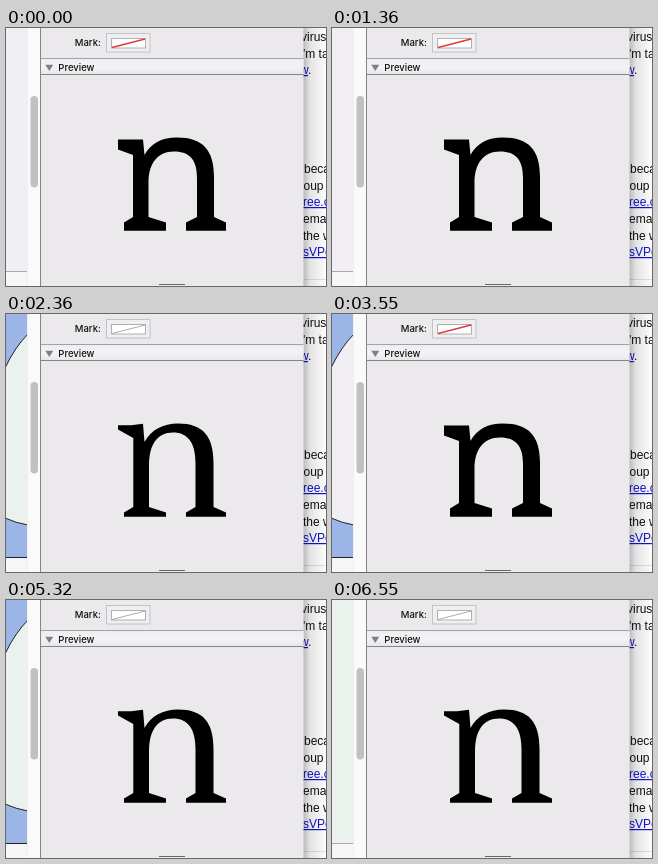
Recreate the animation shown at these times as an HTML page. Size 320 by 258 pixels, loop 6600 ms.

```html
<!DOCTYPE html>
<html lang="en">
<head>
<meta charset="utf-8">
<title>Glyph preview</title>
<style>
  html, body { margin: 0; width: 100%; height: 100%; overflow: hidden; background: #fff; }
  svg { display: block; width: 320px; height: 258px; }
  .ui { font: 500 9.5px Inter, sans-serif; fill: #111; }
  .page { font: 12px "Liberation Sans", Arial, sans-serif; fill: #111; }
  .link { fill: #1212d6; text-decoration: underline; }

  .slab, .serif, .zoom { animation: 6600ms step-end infinite; }
  .slab { animation-name: slab; }
  .serif { animation-name: serif; }
  .zoom { animation-name: zoom; }

  @keyframes slab {
    0%, 38.64%, 53.78% { opacity: 1; }
    31.06%, 46.21%, 64.09%, 100% { opacity: 0; }
  }
  @keyframes serif {
    0%, 38.64%, 53.78% { opacity: 0; }
    31.06%, 46.21%, 64.09%, 100% { opacity: 1; }
  }
  @keyframes zoom {
    0%, 97.12%, 100% { opacity: 0; }
    21.36% { opacity: 1; }
  }
</style>
</head>
<body>
<svg viewBox="0 0 320 258">
  <defs>
    <linearGradient id="bar" x2="0" y2="1">
      <stop stop-color="#eeedef"/>
      <stop offset=".5" stop-color="#f3f2f4"/>
      <stop offset="1" stop-color="#e6e5e7"/>
    </linearGradient>
    <linearGradient id="shade">
      <stop stop-color="#000" stop-opacity=".28"/>
      <stop offset=".3" stop-color="#000" stop-opacity=".11"/>
      <stop offset="1" stop-color="#000" stop-opacity=".01"/>
    </linearGradient>
    <clipPath id="canvas"><path d="M0 0H21V244H0z"/></clipPath>
  </defs>

  <!-- text page behind the panel -->
  <rect width="320" height="258" fill="#fff"/>
  <g class="page">
    <text x="295" y="13">virus</text>
    <text x="297" y="29.5">'m ta</text>
    <text x="294" y="46"><tspan class="link">w</tspan>.</text>
    <text x="298" y="145">beca</text>
    <text x="297.5" y="161.5">oup</text>
    <text x="297" y="178" class="link">ree.c</text>
    <text x="297" y="194.5">ema</text>
    <text x="297" y="211.5">the w</text>
    <text x="297" y="228" class="link">sVPe</text>
  </g>
  <path d="M298 251.5H320" stroke="#e2e2e2"/>
  <rect x="297" width="23" height="258" fill="url(#shade)"/>

  <!-- glyph canvas and its scrollbar -->
  <rect width="35" height="258" fill="#f6f6f6"/>
  <rect class="slab" width="21" height="243" fill="#f1eff4"/>
  <rect class="serif" width="21" height="243" fill="#ebf1ed"/>
  <path d="M0 243.5H21" stroke="#a9a9a9"/>
  <g class="zoom" clip-path="url(#canvas)" fill="#9ab5e6" stroke="#222">
    <path d="M-1 -1H22V20Q9 33 -1 54z"/>
    <path d="M-1 204Q10 209 22 211V243.5H-1z"/>
  </g>
  <rect x="21" width="13" height="258" fill="#fafafa"/>
  <path d="M21.5 0V258" stroke="#eeeeee"/>
  <rect x="24.5" y="68" width="7.5" height="91.5" rx="3.75" fill="#c1c1c1"/>

  <!-- inspector panel -->
  <rect x="34" width="263.5" height="258" fill="#ebe9eb"/>
  <path d="M34.5 0V258" stroke="#858488"/>
  <rect x="35" y="31" width="262.5" height="16" fill="url(#bar)"/>
  <path d="M35 30.5H297.5" stroke="#a3a2a5"/>
  <path d="M35 46.5H297.5" stroke="#858488"/>
  <path d="M39.3 36.8H47.3L43.3 43z" fill="#808083"/>
  <text class="ui" x="52.3" y="42.7">Preview</text>
  <text class="ui" x="68.8" y="18.3">Mark:</text>

  <rect x="100.5" y="5.5" width="43.5" height="18.5" fill="#efeef0" stroke="#c3c2c5"/>
  <rect x="105.5" y="10.5" width="34" height="9.5" fill="#fff" stroke="#b0afb2"/>
  <path class="slab" d="M106 19.5L139 11" stroke="#e0393c" stroke-width="1.3"/>
  <path class="serif" d="M106 19.5L139 11" stroke="#aeaeae"/>

  <path class="slab" d="M112 111.5H137L138.5 127C145 115 156 109.5 171 109.5C197 109.5 208 122 208 149V189L220 194.5V202.7H180V194.5L191 189V150C191 132 184 123.5 168 123.5C151 123.5 142.5 136 142.5 155V189L160 194.5V202.7H118V194.5L127 189V127L112 121.5z"/>
  <path class="serif" d="M112 111.2H125L137 109.8L138.5 128C145 116 157 109.5 172 109.5C197 109.5 207.5 122 207.5 149V193L220 198.5V202.7H180V198.5L189.5 193V149C189.5 129 182 118.5 167 118.5C151 118.5 143 131 143 151V193L160 198.5V202.7H118V198.5L127.3 193V124L112 115.5z"/>
  <path d="M153 256.5H179" stroke="#68676a"/>
</svg>
</body>
</html>
```
